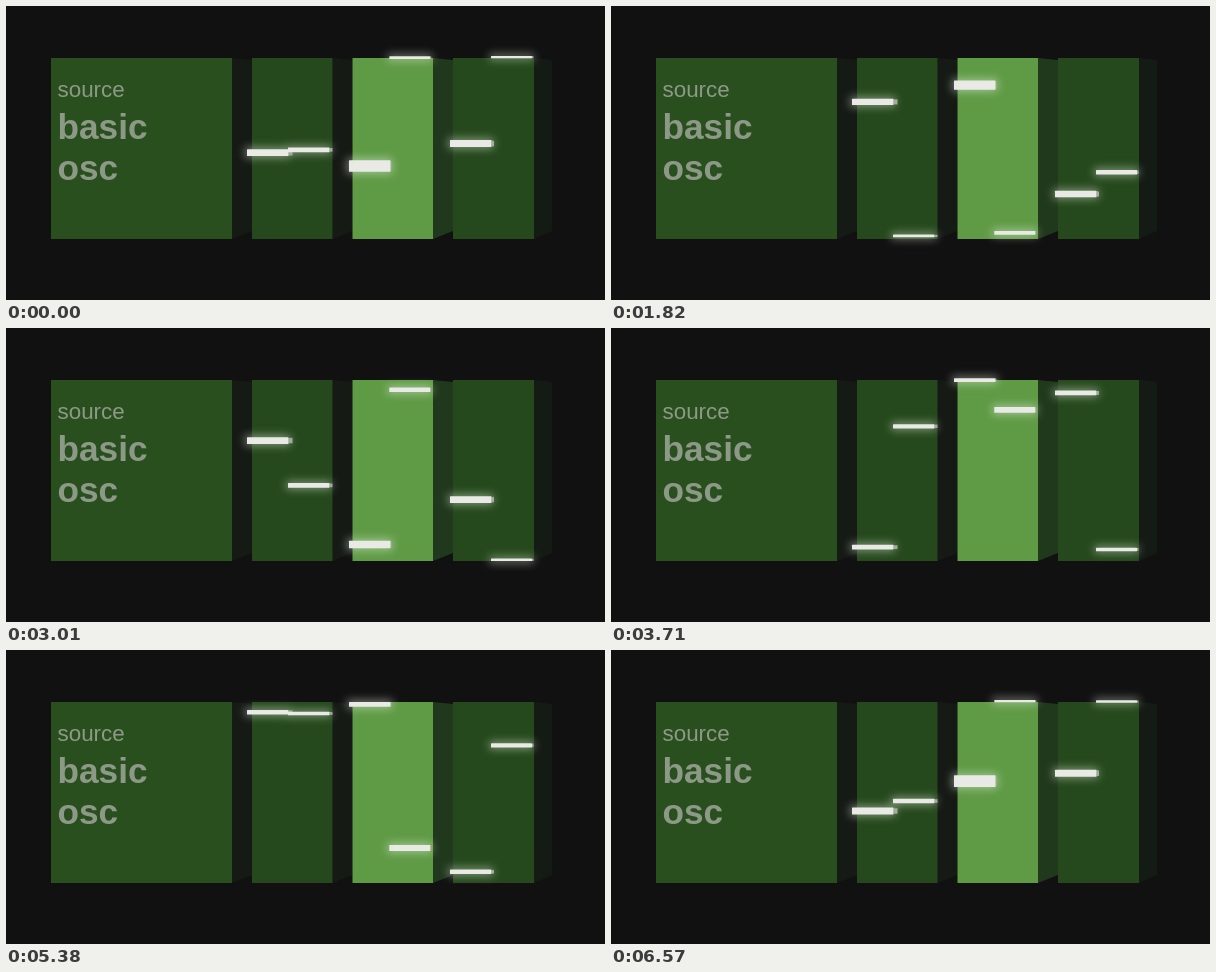
An HTML page that plays this animation: 599x294 px, repeating every 6.64 s.

```html
<!DOCTYPE html>
<html lang="en">
<head>
<meta charset="utf-8">
<style>
  html, body { margin: 0; width: 100%; height: 100%; overflow: hidden; background: #111; }
  svg { display: block; width: 599px; height: 294px; }
  text { font-family: "Liberation Sans", Arial, sans-serif; fill: #8c9986; }
  .big { font-size: 35.2px; font-weight: bold; }
</style>
</head>
<body>
<svg viewBox="0 0 599 294">
  <defs>
    <filter id="blur" filterUnits="userSpaceOnUse" x="0" y="0" width="599" height="294">
      <feGaussianBlur stdDeviation="4"/>
    </filter>
  </defs>
  <rect width="599" height="294" fill="#111"/>
  <g id="panels"></g>
  <text x="51.5" y="91" font-size="22.4">source</text>
  <text x="51.5" y="133" class="big">basic</text>
  <text x="51.5" y="174" class="big">osc</text>
  <g id="glow" fill="#f4fff0" opacity=".42" filter="url(#blur)"></g>
  <g id="caps" fill="#a3aa9e"></g>
  <g id="bars" fill="#e9e9e6"></g>
</svg>
<script>
const LOOP = 6640, STEP = 70, CYCLE = 6557;
const TOP = 52, BOTTOM = 233, MID = 142, SWING = 91;

const panels = [
  { x: 45, right: 226, face: '#2a4f1f', side: '#151a15' },
  { x: 246, right: 326.5, face: '#25481c', side: '#151a15' },
  { x: 346.5, right: 427, face: '#5f9a45', side: '#20381b' },
  { x: 447, right: 528, face: '#25481c', side: '#141b14' }
];

// rate is swings per cycle, phase is in degrees from the top
const bars = [
  { x: 241, w: 41.5, cap: 4, rate: 2, phase: 100.6 },
  { x: 282, w: 41.5, cap: 3, rate: 1, phase: 95 },
  { x: 343, w: 41.5, cap: 1, rate: 4, phase: -86 },
  { x: 383.3, w: 41, cap: 1, rate: 2, phase: 1.3 },
  { x: 444, w: 41.5, cap: 2.5, rate: 2, phase: -79.5 },
  { x: 485, w: 41, cap: 1.5, rate: 1, phase: 5.5 }
];

const byId = id => document.getElementById(id);

function add(parent, tag, attrs = {}) {
  const el = document.createElementNS('http://www.w3.org/2000/svg', tag);
  set(el, attrs);
  return parent.appendChild(el);
}

function set(el, attrs) {
  for (const key in attrs) el.setAttribute(key, attrs[key]);
}

for (const { x, right, face, side } of panels) {
  const back = Math.min(right + 20, 546);
  add(byId('panels'), 'polygon', {
    points: `${right},${TOP} ${back},${TOP + 2} ${back},${BOTTOM - 8} ${right},${BOTTOM}`,
    fill: side
  });
  add(byId('panels'), 'rect', { x, y: TOP, width: right - x, height: BOTTOM - TOP, fill: face });
}

for (const bar of bars) {
  bar.glow = add(byId('glow'), 'rect', { x: bar.x - 2, width: bar.w + 4 });
  bar.end = add(byId('caps'), 'rect', { x: bar.x + bar.w, width: bar.cap });
  bar.body = add(byId('bars'), 'rect', { x: bar.x, width: bar.w, rx: 0.5 });
}

// Time advances in steps, with one longer hold; the first step lags by one.
function stepTime(t) {
  if (t < STEP) return -STEP;
  if (t < 4890) return Math.min(Math.floor(t / STEP) * STEP, 4760);
  return 4890 + Math.floor((t - 4890) / STEP) * STEP;
}

function draw(t) {
  const turn = stepTime(t) / CYCLE * 2 * Math.PI;
  for (const bar of bars) {
    const angle = bar.rate * turn + bar.phase * Math.PI / 180;
    const y = MID - SWING * Math.cos(angle);
    const h = 2.2 + 2.4 * bar.rate * Math.abs(Math.sin(angle));
    set(bar.body, { y: y - h / 2, height: h });
    set(bar.end, { y: y - h * 0.4, height: h * 0.8 });
    set(bar.glow, { y: y - h / 2 - 2, height: h + 4 });
  }
}

const start = performance.now();
function tick() {
  draw((performance.now() - start) % LOOP);
  requestAnimationFrame(tick);
}
tick();
</script>
</body>
</html>
```
